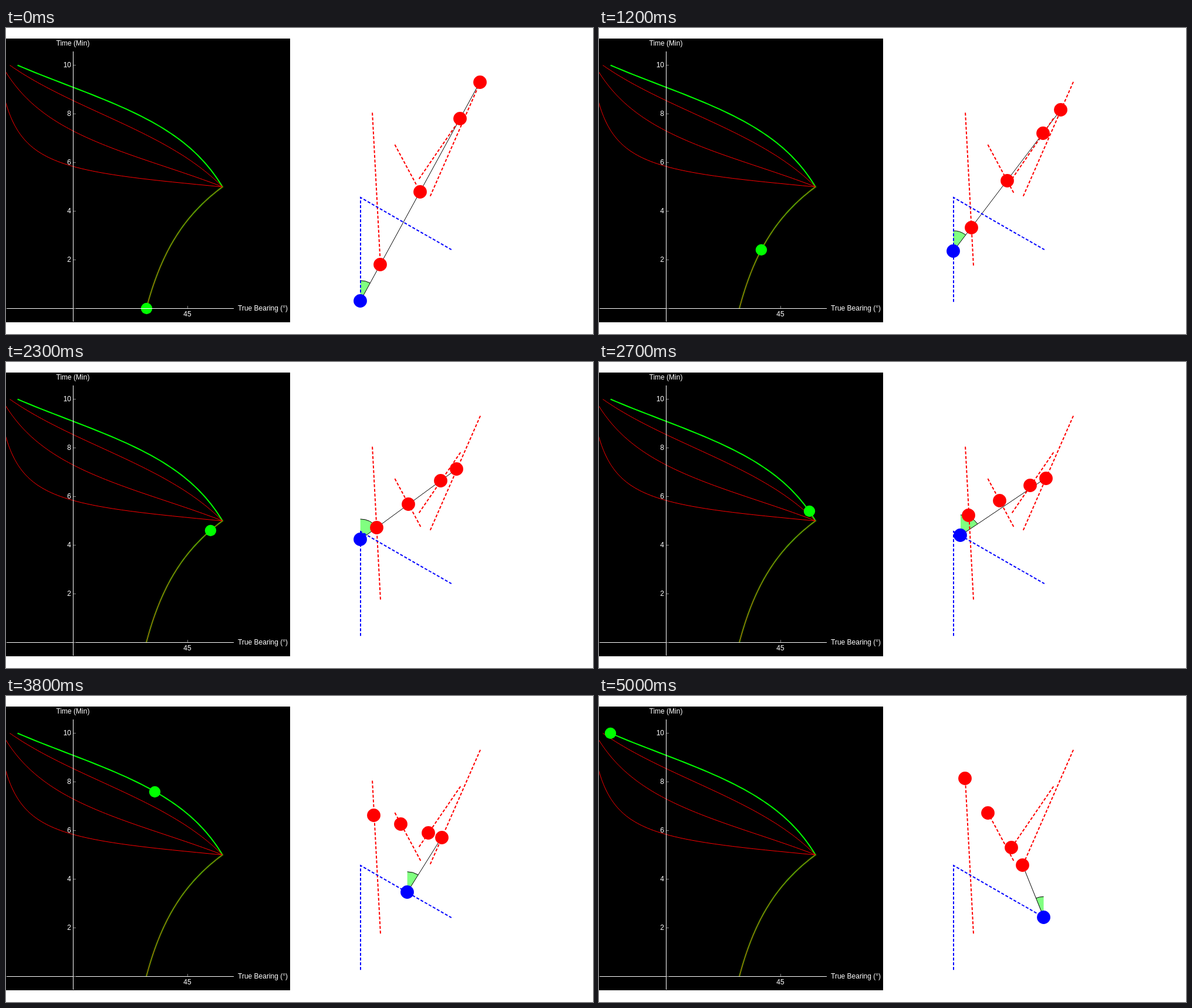
These frames come from a looping animation (1000 by 522 pixels, 5100 ms). An HTML page with a canvas:

```html
<!DOCTYPE html>
<html lang="en">
<head>
<meta charset="utf-8">
<title>Bearing over time</title>
<style>
  html, body { margin: 0; width: 100%; height: 100%; overflow: hidden; background: #fff; }
  canvas { display: block; }
</style>
</head>
<body>
<canvas id="stage" width="1000" height="522"></canvas>
<script>
const ctx = document.getElementById('stage').getContext('2d');
const STEP = 100, STEPS = 51, TURN = 5, END = 10;

const ship = [[603.6, 465.8], [603.6, 288.8], [757.5, 377.3]];
const targets = [
  [[637.5, 403.8], [623.5, 140.5]],
  [[705.5, 279.7], [662.5, 199.5]],
  [[773.3, 154.7], [702.2, 258.5]],
  [[807.3, 92.3], [721.6, 288.2]]
];
const lead = targets[3];

const mix = (a, b, p) => [a[0] + (b[0] - a[0]) * p, a[1] + (b[1] - a[1]) * p];
const shipAt = t => t < TURN
  ? mix(ship[0], ship[1], t / TURN)
  : mix(ship[1], ship[2], (t - TURN) / (END - TURN));
const targetAt = (track, t) => mix(track[0], track[1], t / END);

function bearing(track, t) {
  const s = shipAt(t), p = targetAt(track, t);
  return Math.atan2(p[0] - s[0], s[1] - p[1]);
}

// Position on the chart: bearing across, minutes upwards
const chartPoint = (track, t) =>
  [114.9 + bearing(track, t) * 180 / Math.PI * 4.34, 478.5 - 41.5 * t];

function line(points, color, width) {
  ctx.beginPath();
  points.forEach(p => ctx.lineTo(p[0], p[1]));
  ctx.strokeStyle = color;
  ctx.lineWidth = width;
  ctx.stroke();
}

function dashed(points, color) {
  ctx.save();
  ctx.translate(0.4, 0.4);
  ctx.setLineDash([3, 5]);
  ctx.lineCap = 'square';
  line(points, color, 2);
  ctx.restore();
}

// Dots sit on whole pixels
function dot(p, r, color) {
  ctx.beginPath();
  ctx.arc(Math.floor(p[0]) + 0.5, Math.floor(p[1]) + 0.5, r, 0, 7);
  ctx.fillStyle = color;
  ctx.fill();
}

function curve(track, from, to, color, width) {
  const points = [];
  for (let i = 0; i <= 100; i++) points.push(chartPoint(track, from + (to - from) * i / 100));
  line(points, color, width);
}

function label(text, x, y, align) {
  ctx.textAlign = align;
  ctx.fillText(text, x, y);
}

function axes() {
  ctx.fillStyle = '#fff';
  ctx.fillRect(114, 40, 1, 461);
  ctx.fillRect(1, 478, 387, 1);
  ctx.font = '12px "Liberation Sans", Arial, sans-serif';
  label('Time (Min)', 114, 30, 'center');
  label('True Bearing (°)', 395, 482, 'left');
  label('45', 309, 492, 'center');
  for (let m = 2; m <= END; m += 2) label(m, 111, Math.floor(482.5 - 41.5 * m), 'right');
  ctx.fillStyle = '#808080';
  for (let m = 0; m <= END; m += 2) ctx.fillRect(115, Math.floor(478.5 - 41.5 * m), 4, 1);
  ctx.fillRect(309, 474, 1, 4);
}

function chart(t) {
  ctx.save();
  ctx.beginPath();
  ctx.rect(0, 18, 484, 484);
  ctx.clip();
  ctx.fillStyle = '#000';
  ctx.fillRect(0, 18, 484, 484);
  curve(lead, 0, END, '#0f0', 2);
  curve(lead, 0, TURN, '#f00', 1);
  targets.slice(0, 3).forEach(track => curve(track, TURN, END, '#f00', 1));
  dot(chartPoint(lead, t), 9.7, '#0f0');
  axes();
  ctx.restore();
}

function wedge(c, angle) {
  const north = -Math.PI / 2, r = 35;
  ctx.beginPath();
  ctx.moveTo(c[0], c[1]);
  ctx.arc(c[0], c[1], r, north, north + angle, angle < 0);
  ctx.fillStyle = '#80ff80';
  ctx.fill();
  ctx.beginPath();
  ctx.arc(c[0], c[1], r, north, north + angle, angle < 0);
  ctx.strokeStyle = '#000';
  ctx.lineWidth = 1;
  ctx.stroke();
}

function plan(t) {
  const s = shipAt(t);
  wedge(s, bearing(lead, t));
  line([s, targetAt(lead, t)], '#000', 1);
  targets.forEach(track => dashed(track, '#f00'));
  targets.forEach(track => dot(targetAt(track, t), 11.4, '#f00'));
  dashed(ship, '#00f');
  dot(s, 11.4, '#00f');
}

const start = performance.now();
function draw(now) {
  const step = Math.floor(Math.max(0, now - start) / STEP) % STEPS;
  const t = step * END / (STEPS - 1);
  ctx.fillStyle = '#fff';
  ctx.fillRect(0, 0, 1000, 522);
  chart(t);
  plan(t);
  requestAnimationFrame(draw);
}
draw(start);
</script>
</body>
</html>
```
